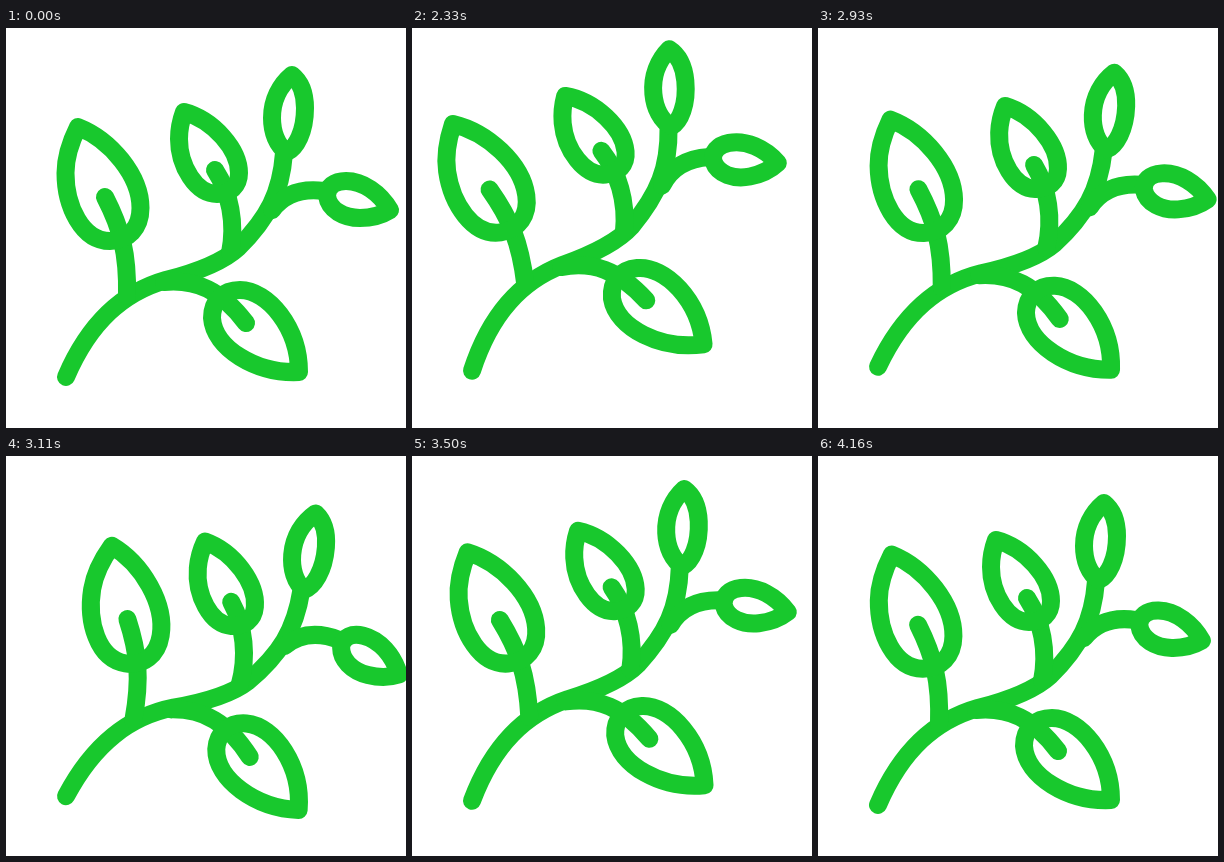
Write an HTML page that moves like this. It is 400 by 400 pixels and loops after 4190 ms.

```html
<!DOCTYPE html>
<html lang="en">
<head>
<meta charset="utf-8">
<title>Swaying branch</title>
<style>
  html, body { margin: 0; width: 100%; height: 100%; overflow: hidden; background: #fff; }
  svg { display: block; width: 100vw; height: 100vh; }
  path { fill: none; stroke: #18c82d; stroke-width: 18; stroke-linecap: round; stroke-linejoin: round; }
</style>
</head>
<body>
<svg viewBox="0 0 400 400">
  <g id="plant">
    <!-- main stem -->
    <path d="M60 349C84 293 118 264 160 252C195 243 219 232 232 220C262 190 275 165 278 125"/>
    <!-- left leaf -->
    <g id="left">
      <path d="M121 268C122 225 115 200 99 169"/>
      <path d="M72 99C105 112 134.500 148 134.500 180C134.500 200 122 213 104 213C76 213 59.500 178 59.500 145C59.500 128 65 113 72 99Z"/>
    </g>
    <!-- middle leaf -->
    <path d="M224 225C230 195 224 165 209 142"/>
    <path d="M178 84C208 92 233 122 233 145C233 158 224 166 211 166C190 166 173 138 173 111C173 101 175 92 178 84Z"/>
    <!-- top leaf -->
    <path d="M286 47C296 55 299 68 299 80C299 104 290 120 281 124C271 118 266 104 266 90C266 72 274 57 286 47Z"/>
    <!-- right leaf -->
    <g id="right">
      <path d="M266 182C278 166 295 160 318 163"/>
      <path d="M384 182C374 165 357 153 340 153C328 153 321 159 321 168C323 182 338 190 354 190C365 190 376 187 384 182Z"/>
    </g>
    <!-- lower leaf -->
    <path d="M158 254C190 251 215 262 240 295"/>
    <path d="M293 344C293 300 262 262 234 262C217 262 206 273 206 290C208 320 250 346 293 344Z"/>
  </g>
</svg>
<script>
  const LOOP = 4190, START = 2030, STEP = 30, HALF_SWING = 425;
  const [plant, left, right] = ['plant', 'left', 'right'].map(id => document.getElementById(id));

  const ease = (t, from, to) => {
    const u = Math.min(1, Math.max(0, (t - from) / (to - from)));
    return (1 - Math.cos(Math.PI * u)) / 2;
  };

  // Ease up to a peak, accelerate back to rest, then ring out.
  function swing(t, s) {
    if (t < s.peak) return s.height * ease(t, s.from, s.peak);
    if (t < s.rest) return s.height * (1 - ((t - s.peak) / (s.rest - s.peak)) ** 2);
    const d = t - s.rest;
    return -s.ring * Math.exp(-d / s.decay) * Math.sin(Math.PI * d / HALF_SWING);
  }

  const body = { from: 2000, peak: 2600, rest: 2885, height: 9.1, ring: 6.5, decay: 670 };
  const leaf = { from: 2090, peak: 2690, rest: 2985, height: 8.2, ring: 7.06, decay: 570 };

  function draw(ms) {
    let t = ms % LOOP;
    t = t < START ? 0 : START + Math.floor((t - START) / STEP) * STEP;
    const lift = 11 * (ease(t, 2000, 2600) - ease(t, 2700, 4100));
    const bend = swing(t, leaf);
    plant.setAttribute('transform', `translate(0 ${-lift}) rotate(${-swing(t, body)} 60 349)`);
    left.setAttribute('transform', `rotate(${-bend} 121 268)`);
    right.setAttribute('transform', `rotate(${-2.07 * bend} 268 180)`);
  }

  const begin = performance.now();
  function tick() {
    draw(performance.now() - begin);
    requestAnimationFrame(tick);
  }
  tick();
</script>
</body>
</html>
```
